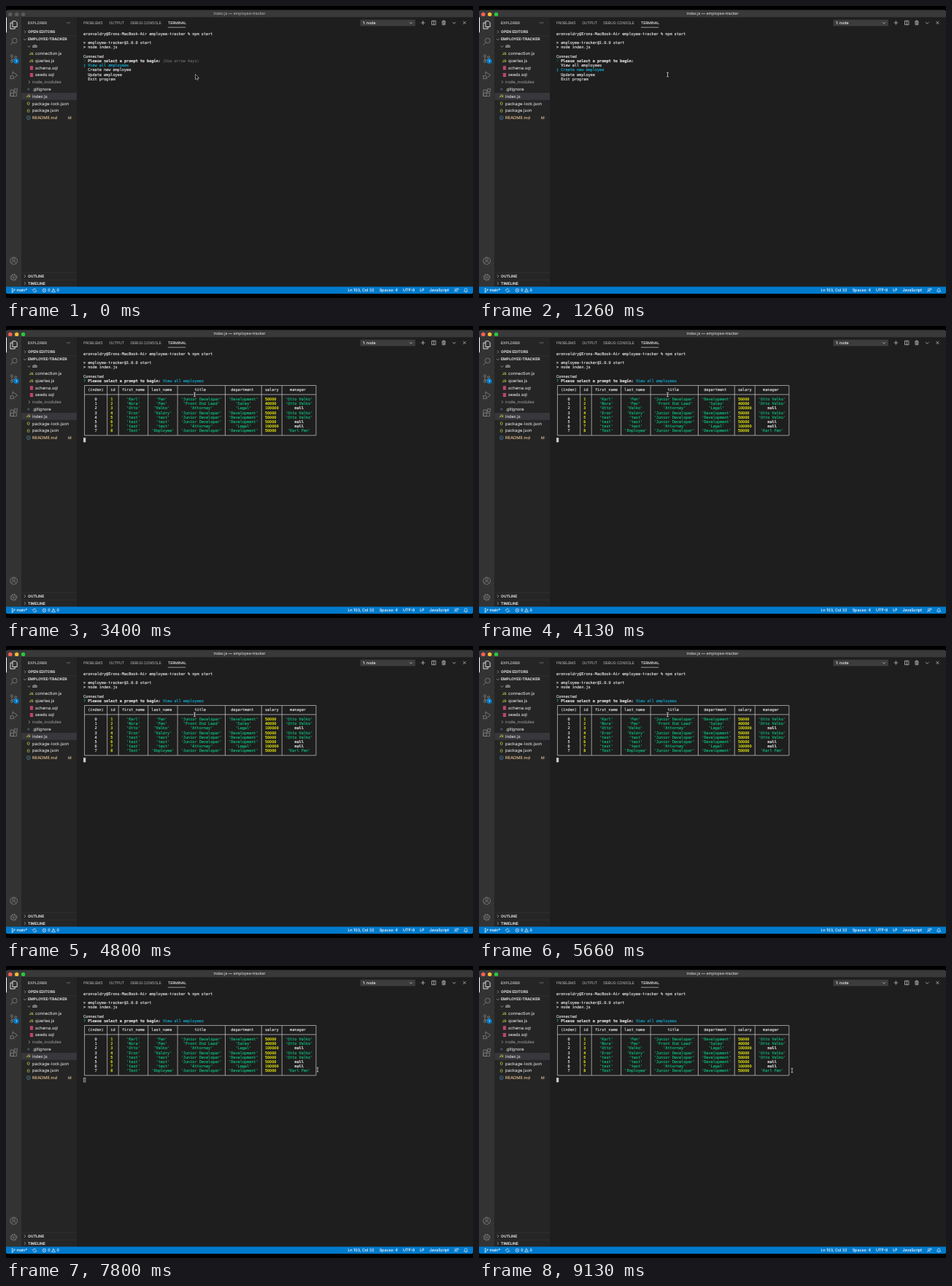
An HTML page for the animation above (9.26 s loop, 640x400 px).

```html
<!DOCTYPE html>
<html lang="en">
<head>
<meta charset="utf-8">
<style>
html, body { margin: 0; width: 100%; height: 100%; overflow: hidden; background: #000; }
svg { display: block; width: 640px; height: 400px; }
text {
  font: 5.75px Inter, sans-serif; text-rendering: geometricPrecision;
  color: #d0d0d0; fill: currentColor; stroke: currentColor; stroke-width: .1;
}
.caps text { font-size: 5.1px; color: #c4c4c4; }
.caps .head { font-weight: 700; color: #d0d0d0; }
.tabs text { font-size: 4.95px; color: #a0a0a0; }
.tabs .on { color: #e7e7e7; }
.status text { font-size: 5.35px; color: #fff; }
.term text { font: 5.333px "DejaVu Sans Mono", monospace; letter-spacing: -.1px; color: #e0e0e0; stroke-width: .14; }
.term .bold { font-weight: 700; color: #e5e5e5; }
.term .dim { color: #666; }
.term .cyan { color: #11a8cd; }
.term .green { color: #0dbc79; }
.term .faint { color: #0a6b49; }
.term .yellow { color: #e5e510; }
.line { fill: none; stroke: #858585; stroke-width: .8; }
.thin { fill: none; stroke: #c5c5c5; stroke-width: .6; }
.white { fill: none; stroke: #fff; stroke-width: .6; }
</style>
</head>
<body>
<svg viewBox="0 0 640 400">
  <clipPath id="frame"><rect y="5.4" width="640" height="388.9" rx="2.5"/></clipPath>
  <g clip-path="url(#frame)">
    <rect width="640" height="400" fill="#1e1e1e"/>
    <rect width="640" height="15.3" fill="#393939"/>
    <rect y="15.3" width="21.3" height="370" fill="#333"/>
    <rect x="21.3" y="15.3" width="75.7" height="370" fill="#252526"/>
    <rect y="384.5" width="640" height="10" fill="#007acc"/>
  </g>
  <g id="lights"><circle cx="5.8" cy="11.4" r="2.67"/><circle cx="14.7" cy="11.4" r="2.67"/><circle cx="23.6" cy="11.4" r="2.67"/></g>
  <text id="title" x="320" y="12.3" text-anchor="middle" style="font-size:5.26px">index.js — employee-tracker</text>

  <!-- activity bar -->
  <rect y="15.5" width="1" height="20.8" fill="#fff"/>
  <path class="line" style="stroke:#fff" d="M9 20.7h4l2.2 2.2v5.6H9zM9 23H6v8.2h6.2v-2.7"/>
  <g class="line">
    <circle cx="11.8" cy="47.4" r="3.4"/><path d="M9.4 49.8 6 53.5"/>
    <circle cx="8" cy="68.4" r="1.5"/><circle cx="8" cy="75.8" r="1.5"/><circle cx="13.2" cy="70.2" r="1.5"/>
    <path d="M8 70v4.2M13.2 71.8c0 2-4 1.4-5.2 2.6"/>
    <path d="M9 94v-4l6.5 4.8-4 3.2"/><circle cx="8.3" cy="97.6" r="2.2"/><path d="M5 95.5l1.5 1M5 100l1.5-1M11.5 100l-1.4-1"/>
    <path d="M6 115h4.3v8.5H6zM6 119.2h8.6v4.3H6zM11.6 113.6h3.8v3.8h-3.8z"/>
    <circle cx="10.6" cy="349" r="4.9"/><circle cx="10.6" cy="347.4" r="1.8"/><path d="M7.3 352.6c.6-3.6 6-3.6 6.6 0"/>
    <circle cx="10.6" cy="371.7" r="3.6"/><circle cx="10.6" cy="371.7" r="1.3"/>
    <circle cx="10.6" cy="371.7" r="4.5" stroke-dasharray="1.7 1.83"/>
  </g>
  <circle cx="14.1" cy="75.5" r="3.6" fill="#007acc"/>
  <text x="14" y="77.1" text-anchor="middle" style="font-size:4.2px;color:#fff">1</text>

  <!-- sidebar -->
  <rect x="21.3" y="119" width="75.7" height="9.7" fill="#37373d"/>
  <path d="M21.3 40.7H97M21.3 365.3H97M21.3 375.2H97" stroke="#3a3a3b" stroke-width=".5"/>
  <g class="caps">
    <text x="30" y="24.9">EXPLORER</text>
    <text class="head" x="30" y="37.3">OPEN EDITORS</text>
    <text class="head" x="30" y="47.4">EMPLOYEE-TRACKER</text>
    <text class="head" x="30" y="372">OUTLINE</text>
    <text class="head" x="30" y="381.9">TIMELINE</text>
  </g>
  <path d="M83 23h5" stroke="#c5c5c5" stroke-width=".9" stroke-dasharray=".9 1.1"/>
  <path class="thin" d="M25 33.6l1.8 1.9-1.8 1.9M25 368.2l1.8 1.9-1.8 1.9M25 378.1l1.8 1.9-1.8 1.9M31 102.2l1.8 1.9-1.8 1.9M24 44.8l1.9 1.8 1.9-1.8M29.7 54.5l1.9 1.8 1.9-1.8"/>
  <g id="files"></g>

  <!-- panel header -->
  <g class="tabs">
    <text x="106" y="24.8">PROBLEMS</text>
    <text x="141.3" y="24.8">OUTPUT</text>
    <text x="170.5" y="24.8">DEBUG CONSOLE</text>
    <text class="on" x="222" y="24.8">TERMINAL</text>
  </g>
  <path d="M222 29.2h24.3" stroke="#e7e7e7" stroke-width=".6"/>
  <rect x="485.5" y="18.7" width="75.5" height="8.8" fill="#3c3c3c"/>
  <text x="489" y="24.9" style="font-size:5.2px;color:#f0f0f0">1: node</text>
  <g class="thin" style="stroke-width:.75">
    <path d="M553 22.2l2 2 2-2M568.6 23h5.6M571.4 20.2v5.6M583.5 20.3h5.4v5.4h-5.4zM586.2 20.3v5.4"/>
    <path d="M597.2 21.2h5.4M599 21v-1h1.8v1M598 21.4v4.3h3.8v-4.3M599.3 22.3v2.5M600.6 22.3v2.5"/>
    <path d="M612 22.2l2.2 2 2.2-2M626.4 20.9l4 4M630.4 20.9l-4 4"/>
  </g>

  <!-- status bar -->
  <g class="status">
    <text x="14.4" y="391.4">main*</text>
    <text x="57.2" y="391.4">0</text>
    <text x="69.5" y="391.4">0</text>
    <text x="468.5" y="391.4">Ln 103, Col 32</text>
    <text x="511.7" y="391.4">Spaces: 4</text>
    <text x="544" y="391.4">UTF-8</text>
    <text x="567.2" y="391.4">LF</text>
    <text x="580.2" y="391.4">JavaScript</text>
  </g>
  <g class="white">
    <circle cx="8.6" cy="387.6" r=".8"/><circle cx="8.6" cy="391.6" r=".8"/><circle cx="11.6" cy="388.6" r=".8"/>
    <path d="M8.6 388.4v2.4M11.6 389.4c0 1-2 .8-3 1.4"/>
    <path d="M37 389.2a2.2 2.2 0 0 1 4-.8M41.3 390a2.2 2.2 0 0 1-4 .8M36 388.6l1 1 1-1M40.3 390.6l1-1 1 1"/>
    <circle cx="52.4" cy="389.5" r="2.3"/><path d="M51.4 388.5l2 2M53.4 388.5l-2 2"/>
    <path d="M65 387l2.5 4.7h-5zM65 388.6v1.6"/>
    <circle cx="616.4" cy="388.6" r="1.2"/><path d="M614.3 392c.3-2.5 3.9-2.5 4.2 0M617.3 387h2.4v2h-1.2"/>
    <path d="M627.6 391c.9-.8.8-1.7.8-2.3 0-2.3 3.4-2.3 3.4 0 0 .6 0 1.5.8 2.3zM629.5 391.9h1.2"/>
  </g>

  <g class="term"><g id="shell"></g><g id="menu"></g><g id="table"></g></g>
  <rect id="block" x="106.2" y="153.2" width="2.8" height="5.8" stroke="#ccc" stroke-width=".5"/>
  <path id="arrow" d="M0 0v7l1.6-1.4 1 2.2 1.2-.5-1-2.2H5z" fill="#000" stroke="#ddd" stroke-width=".6"/>
  <path id="beam" d="M-1.4-3Q0-3 0-2Q0-3 1.4-3M0-2V2M-1.4 3Q0 3 0 2Q0 3 1.4 3" fill="none" stroke="#e8e8e8" stroke-width=".7"/>
</svg>
<script>
const LOOP = 9260, STEP = 400 / 3;
// the screen is shown at 4/9 scale; a terminal cell is 7 by 14 screen pixels
const SCALE = 4 / 9, LEFT = 106, TOP = 37.9, CHAR = 7 * SCALE, LINE = 14 * SCALE;
const $ = id => document.getElementById(id);
const put = (col, row, str, cls = '') =>
  `<text class="${cls}" x="${LEFT + col * CHAR}" y="${TOP + row * LINE + 1.75}">${str}</text>`;

// file tree: name, text x, icon, text colour
const files = [
  ['db', 36], ['connection.js', 40, 'JS'], ['queries.js', 40, 'JS'], ['schema.sql', 40, 'sql'], ['seeds.sql', 40, 'sql'],
  ['node_modules', 36, '', '#8c8c8c'], ['.gitignore', 36, 'dot'], ['index.js', 36, 'JS'],
  ['package-lock.json', 36, '{}'], ['package.json', 36, '{}'], ['README.md', 36, 'info', '#e2c08d']
];
function icon(kind, x, y) {
  if (kind === 'JS' || kind === '{}')
    return `<text x="${x}" y="${y + 1.7}" text-anchor="middle" style="font-size:4.8px;font-weight:600;color:#cbcb41">${kind}</text>`;
  if (kind === 'sql')
    return [-1.8, 0, 1.8].map(d => `<rect x="${x - 2}" y="${y + d - .7}" width="4.4" height="1.4" rx=".6" fill="#f55385"/>`).join('');
  if (kind === 'dot') return `<circle cx="${x}" cy="${y}" r="1.8" fill="#41535b"/>`;
  if (kind === 'info')
    return `<g fill="none" stroke="#519aba" stroke-width=".6"><circle cx="${x}" cy="${y}" r="2.4"/><path d="M${x} ${y - 1.4}v.7m0 .6v1.6"/></g>`;
  return '';
}
$('files').innerHTML = files.map(([name, x, kind, color = '#d0d0d0'], i) => {
  const y = 55.3 + i * 22 * SCALE;
  return icon(kind, x - 5.2, y) + `<text x="${x}" y="${y + 2}" style="color:${color}">${name}</text>`;
}).join('') + '<text x="85" y="155" style="font-size:5.2px;color:#e2c08d">M</text>';

$('shell').innerHTML =
  put(0, 0, 'eronvaldry@Erons-MacBook-Air employee-tracker % npm start') +
  put(0, 2, '&gt; employee-tracker@1.0.0 start') + put(0, 3, '&gt; node index.js') +
  put(0, 5, 'Connected') + put(2, 6, 'Please select a prompt to begin:', 'bold');

// table
const head = ['(index)', 'id', 'first_name', 'last_name', 'title', 'department', 'salary', 'manager'];
const DEV = ['Junior Developer', 'Development', 50000], LAW = ['Attorney', 'Legal', 100000], BOSS = 'Otto Velko';
const people = [
  ['Karl', 'Fen', ...DEV, BOSS], ['Nora', 'Fen', 'Front End Lead', 'Sales', 40000, BOSS],
  ['Otto', 'Velko', ...LAW, null], ['Eron', 'Valdry', ...DEV, BOSS], ['test', 'test', ...DEV, BOSS],
  ['test', 'test', ...DEV, null], ['test', 'test', ...LAW, null], ['Test', 'Employee', ...DEV, 'Karl Fen']
];
const show = v => typeof v === 'string' ? `'${v}'` : String(v);
const tint = v => v === null ? 'bold' : typeof v === 'string' ? 'green' : 'yellow';
const rows = people.map((p, i) => [i + 1, ...p]);
const widths = head.map((h, c) => 2 + Math.max(h.length, ...rows.map(r => c ? show(r[c - 1]).length : 0)));
const edges = [0];
widths.forEach((w, c) => edges.push(edges[c] + w + 1));
const centred = (c, row, str, cls) =>
  put(edges[c] + 1 + Math.floor((widths[c] - str.length) / 2), row, str, cls);
const edgeX = c => LEFT + (c + .5) * CHAR, lineY = r => TOP + r * LINE;
const rules = edges.map(e => `M${edgeX(e)} ${lineY(7)}V${lineY(18)}`).join('') +
  [7, 9, 18].map(r => `M${edgeX(0)} ${lineY(r)}H${edgeX(edges[8])}`).join('');
$('table').innerHTML = put(0, 6, '?', 'green') + put(35, 6, 'View all employees', 'cyan') +
  `<path d="${rules}" fill="none" stroke="#d0d0d0" stroke-width=".7"/>` +
  head.map((h, c) => centred(c, 8, h)).join('') +
  rows.map((r, i) => centred(0, 10 + i, String(i)) +
    r.map((v, c) => centred(c + 1, 10 + i, show(v), tint(v))).join('')).join('');

// menu
const options = ['View all employees', 'Create new employee', 'Update employee', 'Exit program'];
const presses = [[0, 0], [1000, 1], [1400, 2], [1800, 3], [2200, 2], [2460, 1], [2700, 0]];
const TABLE_AT = 3000, FOCUS_AT = 460;
const drawMenu = (picked, hint) => put(0, 6, '?', 'faint') +
  (hint ? put(35, 6, '(Use arrow keys)', 'dim') : '') +
  options.map((o, i) => put(2, 7 + i, o, i === picked ? 'cyan' : '')).join('') +
  put(0, 7 + picked, '❯', 'cyan');

// pointer: time, x, y
const path = [[0, 259.5, 93.6], [730, 258.5, 94], [6600, 258.5, 94], [7600, 427, 142], [8200, 427, 142], [8800, 429, 143]];
function pointer(t) {
  const n = path.findIndex(p => p[0] > t);
  if (n < 0) return path[path.length - 1].slice(1);
  const [t0, x0, y0] = path[n - 1], [t1, x1, y1] = path[n];
  const u = (t - t0) / (t1 - t0), e = u * u * (3 - 2 * u);
  return [x0 + (x1 - x0) * e, y0 + (y1 - y0) * e];
}

const lights = ['#ff5f57', '#febc2e', '#28c840'];
const visible = (id, on) => $(id).setAttribute('visibility', on ? 'visible' : 'hidden');
let lastMenu = '';
function draw(now) {
  const raw = now % LOOP;
  const t = Math.max(0, 60 + Math.floor((raw - 59) / STEP) * STEP + 1);
  const done = t >= TABLE_AT, focused = t >= FOCUS_AT;
  const picked = presses.filter(p => p[0] <= t).pop()[1];
  const menu = done ? '' : drawMenu(picked, t < presses[1][0]);
  if (menu !== lastMenu) $('menu').innerHTML = lastMenu = menu;
  visible('table', done);
  visible('block', done);
  $('block').setAttribute('fill', t > 7660 && t < 8200 ? '#4a4a4a' : '#ccc');
  $('title').style.color = focused ? '#c4c4c4' : '#a0a0a0';
  [...$('lights').children].forEach((c, i) => c.setAttribute('fill', focused ? lights[i] : '#5a5a5a'));
  visible('arrow', !focused);
  visible('beam', focused);
  for (const id of ['arrow', 'beam']) $(id).setAttribute('transform', `translate(${pointer(t)})`);
}
function tick(now) { draw(now); requestAnimationFrame(tick); }
draw(0);
requestAnimationFrame(tick);
</script>
</body>
</html>
```
